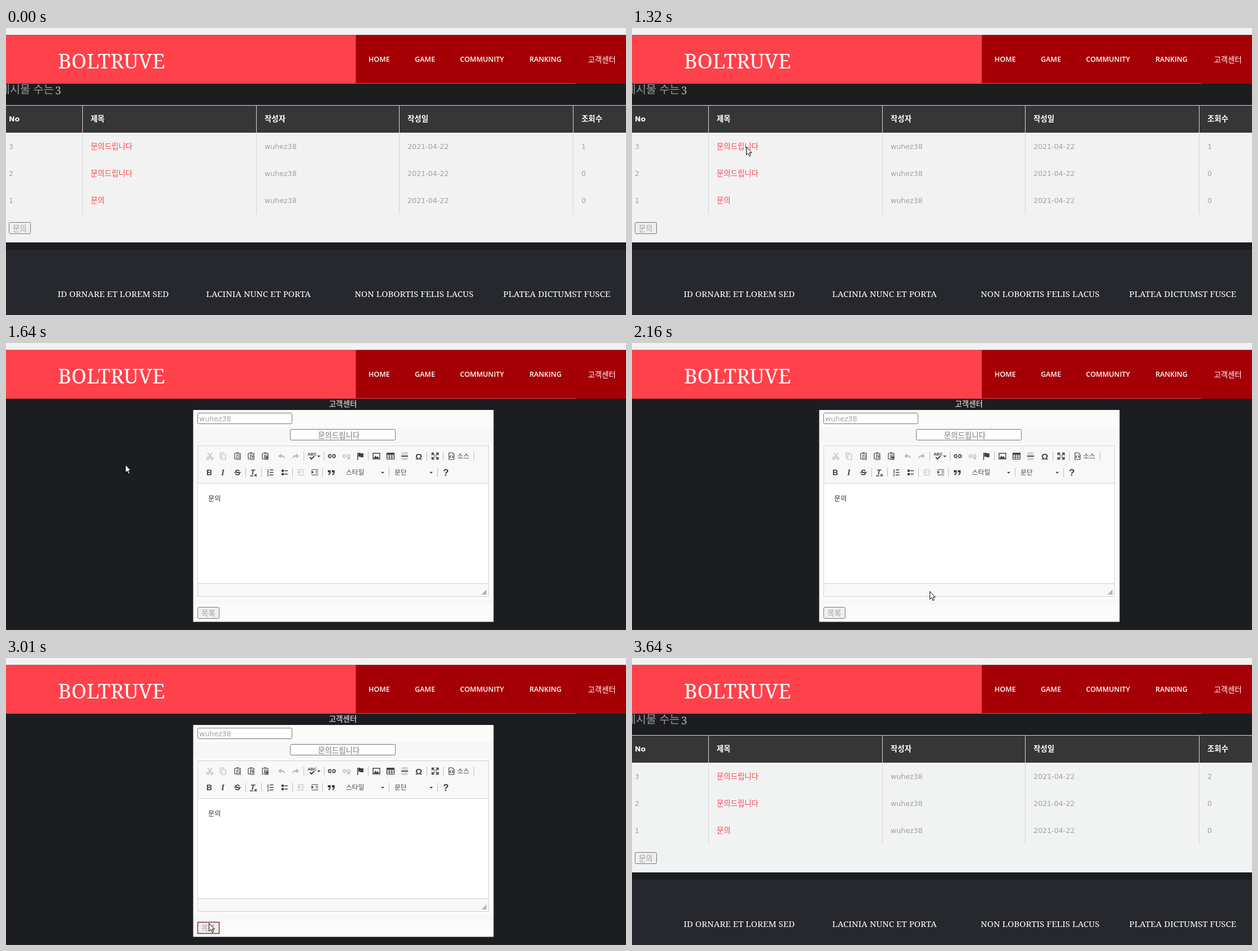
An HTML page for the animation above (4.25 s loop, 1098 px wide and 510 px high).

```html
<!DOCTYPE html>
<html lang="ko">
<head>
<meta charset="utf-8">
<title>고객센터</title>
<style>
html, body { margin: 0; width: 100%; height: 100%; overflow: hidden; background: #1c1d21; }
svg { display: block; width: 100vw; height: 100vh; }
text { font-family: "DejaVu Sans", "Noto Sans CJK KR", "Noto Sans CJK", sans-serif; font-size: 12.6px; white-space: pre; }
.ko { font-family: "Noto Sans CJK KR", "Noto Sans CJK", sans-serif; font-size: 13.4px; }
.thin { font-weight: 300; }
.bold { font-weight: 700; }
.nav { font-family: "Open Sans", "Noto Sans", sans-serif; font-size: 12.5px; font-weight: 600; }
.serif { font-family: "Noto Serif", serif; font-size: 15.15px; }
.head { font-weight: 500; }
.foot { font-size: 12.4px; }
.tile { font-family: "Open Sans", "Noto Sans", sans-serif; font-size: 14px; font-weight: 600; }
.tool { font-family: "Liberation Sans", sans-serif; font-weight: 700; }
</style>
</head>
<body>
<svg id="stage" viewBox="0 0 1098 510" xmlns="http://www.w3.org/2000/svg"></svg>
<script>
const RED = '#ff414b', GRAY = '#a2a2a5', DARK = '#1c1d21', FOOT = '#27282d', INK = '#404040', OFF = '#bdbdbd';
const USER = 'wuhez38';
const LOOP = 4250;

const rect = (x, y, w, h, fill, extra = '') =>
  `<rect x="${x}" y="${y}" width="${w}" height="${h}" fill="${fill}" ${extra}/>`;
const esc = s => s.replace(/&/g, '&amp;').replace(/</g, '&lt;').replace(/>/g, '&gt;');
const text = (x, y, s, fill, cls = '', extra = '') =>
  `<text x="${x}" y="${y}" fill="${fill}" class="${cls}" ${extra}>${esc(s)}</text>`;
const line = (d, color, width = 1.4) =>
  `<path d="${d}" fill="none" stroke="${color}" stroke-width="${width}"/>`;
const shape = (d, color) => `<path d="${d}" fill="${color}" fill-rule="evenodd"/>`;
const at = (x, y, body) => `<g transform="translate(${x} ${y})">${body}</g>`;
const box = (x, y, w, h, fill = '#fff') =>
  rect(x + .5, y + .5, w - 1, h - 1, fill, 'stroke="#767676" rx="2"');
const button = (x, y, label, id = '') =>
  `<g ${id && `id="${id}"`}>` + box(x, y, 39, 21, '#efefef') + text(x + 7, y + 15.5, label, GRAY, 'ko thin') + '</g>';

function header() {
  const items = [[642, 'HOME'], [724, 'GAME'], [804, 'COMMUNITY'], [927, 'RANKING']];
  return rect(0, 0, 1098, 12.5, '#f2f2f2') +
    rect(0, 12.5, 620, 86.5, RED) + rect(619.5, 12.5, 479, 86.5, '#a50006') + rect(619.5, 98, 389, 1, RED) +
    text(92, 72, 'BOLTRUVE', '#fff', 'serif', 'style="font-size:36.3px"') +
    items.map(([x, s]) => text(x, 60, s, '#fff', 'nav')).join('') +
    text(1030.5, 60.5, '고객센터', '#fff', 'ko', 'font-weight="500"');
}

function footHeads(y) {
  return ['ID ORNARE ET LOREM SED', 'LACINIA NUNC ET PORTA', 'NON LOBORTIS FELIS LACUS', 'PLATEA DICTUMST FUSCE']
    .map((s, i) => text(91.5 + 263 * i, y, s, '#fff', 'serif head')).join('');
}

function list(views, paper) {
  const cols = [5, 150, 458, 711, 1019];
  let s = rect(0, 99, 1098, 38, DARK) +
    text(-11, 115.5, '게시물 수는', '#98989a', 'ko thin', 'style="font-size:19.6px"') +
    text(87, 118, '3', '#b4b4b6', 'serif', 'style="font-size:19px"') +
    rect(0, 137, 1098, 49, '#363636') + rect(0, 137, 1098, 1, '#d8d8d8') +
    rect(0, 186, 1098, 195, paper);
  for (const x of [135, 443, 696, 1004])
    s += rect(x, 138, 1, 48, '#d8d8d8') + rect(x, 186, 1, 145, '#d4d4d4');
  ['No', '제목', '작성자', '작성일', '조회수'].forEach((h, i) =>
    s += text(cols[i], 166, h, '#fff', i ? 'ko bold' : 'bold'));
  ['문의드립니다', '문의드립니다', '문의'].forEach((title, i) => {
    const y = 215 + 48 * i;
    s += text(5, y, String(3 - i), GRAY) + text(cols[1], y, title, RED, 'ko thin') +
      text(cols[2], y, USER, GRAY) + text(cols[3], y, '2021-04-22', GRAY) +
      text(cols[4], y, String(i ? 0 : views), GRAY);
  });
  return s + button(5, 345, '문의') + rect(0, 381, 1098, 13, DARK) +
    rect(0, 394, 1098, 116, FOOT) + footHeads(478);
}

function formTop(right, bottom, titleX) {
  const w = right - 332;
  return rect(0, 99, 1098, 411, DARK) + text(572, 113, '고객센터', '#b4b4b6', 'ko bold') +
    rect(331.5, 119, w + 1, bottom - 119, '#fbfbf9') + rect(332, 149, w, 30, '#f7f7f7') +
    box(339, 124, 168, 20) + text(342, 139, USER, GRAY) +
    box(titleX, 153, 187, 20) + text(titleX + 49.5, 168.5, '문의드립니다', GRAY, 'ko bold');
}

function footer() {
  let s = rect(0, 276, 1098, 234, '#26282f') + rect(0, 385, 1098, 125, FOOT) + footHeads(359);
  const icons = [
    shape('M0 7C-2 4-5 1-5-2a5 5 0 0 1 10 0C5 1 2 4 0 7zM0-4a2 2 0 0 0 0 4a2 2 0 0 0 0-4z', GRAY),
    shape('M4-7l3 .8C7.5 1 1 7.5-6.2 7l-.8-3 3.3-1.4 1.5 1.7C.5 3 3 .5 4.3-2.2L2.6-3.7z', GRAY),
    line('M-6.5-5h13v10h-13zM-6.5-3l6.5 5 6.5-5', GRAY)];
  const contact = ['Seoul', '+00 (555) 010 4826', 'hello@mail.test'];
  const links = ['Morbi tristique senectus', 'Habitasse platea dictumst', 'Egestas in hac habitasse'];
  for (let i = 0; i < 3; i++) {
    const y = 421 + 47 * i;
    s += at(105, y - 3.5, icons[i]) + text(127, y, contact[i], GRAY, 'foot') + text(618, y, links[i], RED, 'foot');
    if (i < 2) s += rect(92, y + 19, 220, 1, '#3f4045') + rect(618, y + 19, 220, 1, '#3f4045');
  }
  ['Porta tellus massa consectetuer', 'sem eget pharetra ligula purus sit', 'amet dui.'].forEach((l, i) =>
    s += text(355, 421 + 19.5 * i, l, RED, 'foot'));
  s += `<text x="355" y="494" fill="${GRAY}" class="foot">Friday, 6<tspan dy="-5" font-size="10.8">th</tspan><tspan dy="5"> April 2045</tspan></text>`;
  const words = (x, y) => text(0, 0, 'IMAGE PLACEHOLDER', '#6a6a6a', 'tile', `transform="translate(${x} ${y}) rotate(-45)"`);
  for (let i = 0; i < 6; i++)
    s += at(881 + 77.5 * (i % 3), 407 + 77.5 * Math.floor(i / 3),
      `<g clip-path="url(#tile)">${rect(0, 0, 66, 66, '#333')}${words(6, 50)}${words(-1, 98)}</g>`);
  return s;
}

function form() {
  return formTop(873, 262, 509) + rect(332, 179, 541, 52, '#f9f9f9') +
    box(339, 182, 526, 36) + rect(846, 184, 17, 32, '#f0f0f0') +
    shape('M850.5 195l4.5-4.5 4.5 4.5z', '#a0a0a0') + shape('M850.5 205.5l4.5 4.5 4.5-4.5z', '#404040') +
    text(342, 198, '<p>문의</p>', GRAY) + button(339, 236, '목록') + footer();
}

function toolbar() {
  const ring = x => `M${x} 4a2 2 0 1 0 4 0a2 2 0 1 0-4 0`;
  const clip = 'M-5-5h10v2M-5-5v10h3M-2-6h4M-1-2h6v8h-6z';
  const undo = 'M-6 0L-1-5V-2C4-2 6 1 6 5C4 2 2 1-1 1V4z';
  const chain = 'M-1-2.6h-2.5a2.6 2.6 0 0 0 0 5.2h2.5M1-2.6h2.5a2.6 2.6 0 0 1 0 5.2h-2.5M-3 0h6';
  const drop = x => shape(`M${x - 3} -1h6l-3 3z`, INK);
  const glyph = (s, size, x, y, more = '') =>
    text(x, y, s, INK, 'tool', `text-anchor="middle" style="font-size:${size}px;${more}"`);
  const rows = 'M-1-4.5h6.5M-1 0h6.5M-1 4.5h6.5';
  const dent = 'M-6-5h12M1-2h5M1 1h5M-6 4.5h12';
  const quote = x => `M${x}-4h5v4q0 4-4 5v-2q2-1 2-3h-3z`;
  const top = [
    [361, line('M-4-6L2.5 3M4-6L-2.5 3' + ring(-5.5) + ring(1.5), OFF)],
    [384, line('M-5-6h6v2M-5-6v9h3M-2-3h7v9h-7z', OFF, 1.2)],
    [410, line(clip + 'M1 1h3M1 3.5h3', INK, 1.2)],
    [434, line(clip + 'M.5 .5h4M2.5 .5v4', INK, 1.2)],
    [459, line(clip + 'M.5 0l1 4 1-3 1 3 1-4', INK, 1.2)],
    [488, shape(undo, OFF)],
    [513, `<g transform="scale(-1 1)">${shape(undo, OFF)}</g>`],
    [542, glyph('ABC', 7.5, 0, -1) + line('M-4 2l3 3 5-5', INK, 2) + drop(12)],
    [577, line(chain, INK, 1.7)],
    [603, line(chain, OFF, 1.5) + line('M2 2l4 4m0-4l-4 4', OFF)],
    [627, shape('M-5-6h1.5v13h-1.5zM-3-6h3l1 1h5v7h-5l-1-1h-3z', INK)],
    [656, line('M-6-5h12v10h-12z', INK) + shape('M-5 4l3-5 2 3 2-2 3 4z', INK)],
    [681, line('M-6.5-5.5h13v11h-13zM-6.5-2h13M-6.5 2h13M-2.2-4v9M2.2-4v9', INK, 1.2) + rect(-7, -6, 14, 3, INK)],
    [706, line('M-5.5-6h11M-5.5-3.5h11M-5.5 3.5h11M-5.5 6h11', '#a0a0a0', 1.2) + line('M-6 0h12', INK, 2)],
    [731, glyph('Ω', 15, 0, 5.5)],
    [760, line('M-5.5-1.5v-4h4M5.5-1.5v-4h-4M-5.5 1.5v4h4M5.5 1.5v4h-4M-5-5l4 4M5-5l-4 4M-5 5l4-4M5 5l-4-4', INK, 1.7)],
    [789, line('M-4.5-6h6l3 3v9h-9z', INK, 1.2) + line('M-1-1l-2 2 2 2M1-1l2 2-2 2', INK, 1.2)]];
  const low = [
    [360, glyph('B', 14, 0, 5)],
    [384, glyph('I', 14, 0, 5, 'font-family:Liberation Serif,serif;font-style:italic')],
    [410, glyph('S', 14, 0, 5) + line('M-6 0h12', INK)],
    [438, glyph('T', 13, -1, 4, 'font-style:italic') + line('M2 3l4 4m0-4l-4 4M-6 6h6', INK)],
    [468, line(rows, INK) + glyph('1', 6, -4, -2.5) + glyph('2', 6, -4, 2.2) + glyph('3', 6, -4, 7)],
    [493, line('M0-3h6M0 3h6', INK, 1.6) + shape('M-5-5h4v4h-4zM-5 1h4v4h-4z', INK)],
    [522, line(dent, OFF, 1.2) + shape('M-2-3.5v6l-4-3z', OFF)],
    [547, line(dent, INK, 1.2) + shape('M-6-3.5v6l4-3z', INK)],
    [576, shape(quote(-6) + quote(1), INK)],
    [667, drop(0)], [753, drop(0)],
    [779, glyph('?', 17, 0, 6)]];
  const seps = (xs, y) => xs.map(x => rect(x, y - 8, 1, 16, '#bcbcbc')).join('');
  const label = (x, y, s) => text(x, y, s, '#484848', 'ko', 'style="font-size:11.8px"');
  return top.map(([x, b]) => at(x, 201, b)).join('') + low.map(([x, b]) => at(x, 230, b)).join('') +
    seps([527, 563, 641, 745, 774, 828], 201) + seps([424, 452, 507, 560, 678, 764], 230) +
    label(799, 204.5, '소스') + label(602, 234, '스타일') + label(688, 234, '문단');
}

function editor() {
  return formTop(863, 495.5, 503) + rect(332, 179, 531, 316, '#fbfbfb') + rect(332, 456, 531, 9, '#f7f7f7') +
    rect(339.5, 182.5, 515, 268, '#fff', 'stroke="#d1d1d1"') +
    rect(340, 183, 514, 66, '#f8f8f8') + rect(340, 249, 514, 1, '#d1d1d1') +
    rect(340, 427, 514, 23, '#f8f8f8') + rect(340, 427, 514, 1, '#d1d1d1') +
    shape('M851 438v9h-9z', '#b5b5b5') + toolbar() +
    text(358, 280.5, '문의', '#333', 'ko', 'style="font-size:12.2px"') +
    button(339, 469, '목록', 'back') + rect(0, 509, 1098, 1, FOOT);
}

const views = { first: list(1, '#f2f2f2'), form: form(), editor: editor(), last: list(2, '#f1f2f2') };
const pens = {
  arrow: '<path d="M.5 .5v14l3.2-3 2.3 5.2 2.2-1-2.2-5h4.2z" fill="#fff" stroke="#000"/>',
  hand: '<path d="M-1.5 12V2a1.6 1.6 0 0 1 3.2 0v6q3-1 3 1 3-1 3 1 2.6-.6 2.6 1.5v5q0 3-2 5.5h-8q-2-4-5-7.5-1-3 1.5-2.5z" fill="#fff" stroke="#000"/>',
  beam: '<path d="M-2.5-8q2.5 0 2.5 2 0-2 2.5-2M0-6V6M-2.5 8q2.5 0 2.5-2 0 2 2.5 2" fill="none" stroke="#fff"/>'
};
const group = (id, body, extra = '') => `<g id="${id}" ${extra}>${body}</g>`;
const stage = document.getElementById('stage');
stage.innerHTML = '<defs><clipPath id="tile"><rect width="66" height="66"/></clipPath></defs>' +
  Object.entries(views).map(([id, b]) => group(id, b)).join('') + header() +
  Object.entries(pens).map(([id, b]) => group(id, b, id === 'beam' ? 'style="mix-blend-mode:difference"' : '')).join('');
const el = id => document.getElementById(id);
const show = (id, on) => el(id).setAttribute('display', on ? 'inline' : 'none');

// Pointer moves: start, end, then one point per evenly spaced step.
const moves = [
  [70, 530, [[988, 487], [905, 425], [780, 350], [620, 280], [460, 228], [340, 202], [273, 212]]],
  [610, 760, [[244, 213], [215, 209], [195, 207]]],
  [990, 1080, [[188, 198], [196, 209]]],
  [1320, 1400, [[202, 211], [211, 216]]],
  [1780, 2240, [[262, 238], [380, 292], [530, 345], [630, 388], [597, 416], [527, 441], [482, 469]]],
  [2320, 2780, [[455, 473], [428, 476], [404, 478], [384, 478], [370, 476], [363, 473], [360, 472]]],
  [2860, 2860, [[359, 471]]],
  [3100, 3100, [[364, 470]]],
  [3250, 3560, [[430, 450], [560, 402], [730, 335], [900, 262], [1025, 210]]]
];

function pointer(t) {
  if (t < 70 || t >= 3640) return null;
  const [from, to, pts] = moves.filter(m => m[0] <= t).pop();
  const gap = (to - from) / (pts.length - 1) || 1;
  let k = pts.length - 1;
  while (k > 0 && Math.round((from + gap * k) / 10) * 10 > t) k--;
  return pts[k];
}

function draw(t) {
  const view = t < 1400 ? 'first' : t < 1640 ? 'form' : t < 3100 ? 'editor' : 'last';
  for (const id in views) show(id, id === view);
  const p = pointer(t);
  const inside = (x, y, w, h) => p && p[0] >= x && p[0] < x + w && p[1] >= y && p[1] < y + h;
  let pen = 'arrow';
  if (view === 'first' && t < 1320 && inside(150, 195, 74, 24)) pen = 'hand';
  if (view === 'editor' && inside(340, 250, 514, 177) || view === 'last' && t < 3250) pen = 'beam';
  for (const id in pens) show(id, p && id === pen);
  if (p) el(pen).setAttribute('transform', `translate(${p[0]} ${p[1]})`);
  const hover = view === 'editor' && inside(339, 469, 39, 21);
  const edge = el('back').querySelector('rect');
  edge.setAttribute('stroke', hover ? '#8f3a42' : '#767676');
  edge.setAttribute('stroke-width', hover ? 1.6 : 1);
  edge.setAttribute('rx', hover ? 0 : 2);
}

function tick(now) {
  draw(now % LOOP);
  requestAnimationFrame(tick);
}
draw(0);
requestAnimationFrame(tick);
</script>
</body>
</html>
```
